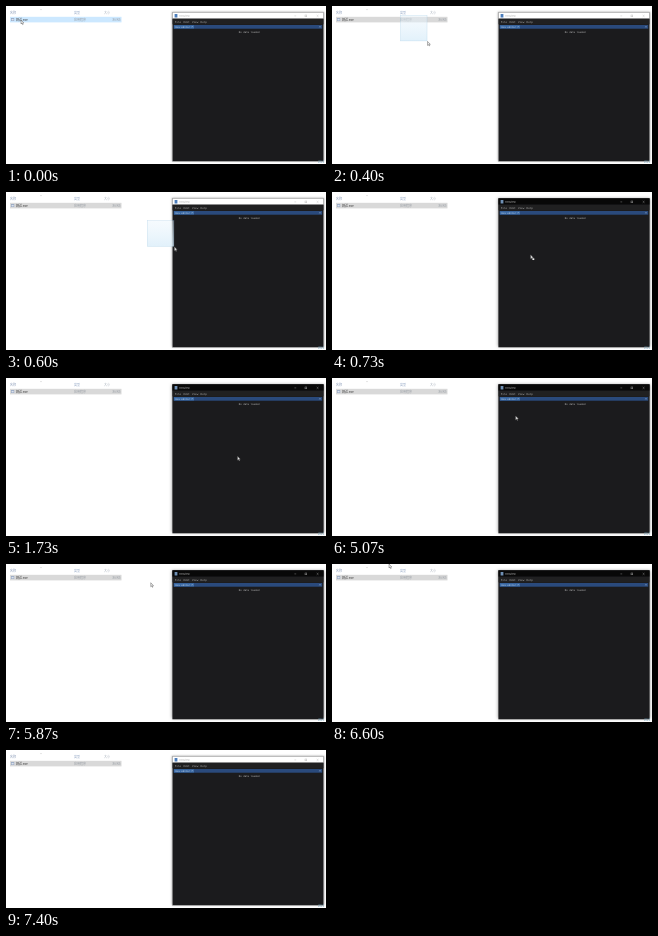
Recreate the animation shown at these times as an HTML page with a canvas. Size 320 by 158 pixels, loop 7590 ms.

```html
<!DOCTYPE html>
<html lang="zh">
<head>
<meta charset="utf-8">
<style>
  html, body { margin: 0; width: 100%; height: 100%; overflow: hidden; background: #fff; }
  canvas { display: block; width: 320px; height: 158px; }
</style>
</head>
<body>
<canvas id="stage"></canvas>
<script>
const LOOP = 7590, TICK = 200 / 3;
const DRAG_START = 130, DROP = 700, BLUR = 7300;
const SANS = '"Noto Sans CJK SC", "Noto Sans CJK", sans-serif';
const MONO = '"DejaVu Sans Mono", monospace';
const canvas = document.getElementById('stage');
const c = canvas.getContext('2d');
const dpr = window.devicePixelRatio || 1;
canvas.width = 320 * dpr;
canvas.height = 158 * dpr;

// Each eased pointer move: start, end, destination
const moves = [
  { from: 70, to: 800, x: 203, y: 64 },
  { from: 1330, to: 1870, x: 237, y: 81 },
  { from: 2600, to: 2800, x: 234, y: 78 },
  { from: 4730, to: 5130, x: 180, y: 35 },
  { from: 5130, to: 5530, x: 172, y: 26 },
  { from: 5600, to: 6330, x: 82, y: 2 },
  { from: 6330, to: 6600, x: 57, y: 0 },
  { from: 6800, to: 6930, x: 52, y: -6 }
];

const ease = k => k * k * (3 - 2 * k);

function pointerAt(t) {
  let x = 15, y = 14;
  for (const m of moves) {
    const k = ease(Math.min(1, Math.max(0, (t - m.from) / (m.to - m.from))));
    x += (m.x - x) * k;
    y += (m.y - y) * k;
  }
  return [x, y];
}

function rect(x, y, w, h, color) {
  c.fillStyle = color;
  c.fillRect(x, y, w, h);
}

function frame(x, y, w, h, color, width = 0.4) {
  c.strokeStyle = color;
  c.lineWidth = width;
  c.strokeRect(x, y, w, h);
}

function text(s, x, y, size, color, family = SANS) {
  c.font = `${size}px ${family}`;
  c.fillStyle = color;
  c.fillText(s, x, y);
}

function line(points, color, width = 0.4) {
  c.beginPath();
  points.forEach(([x, y]) => c.lineTo(x, y));
  c.strokeStyle = color;
  c.lineWidth = width;
  c.stroke();
}

function cross(x, y, r, color) {
  line([[x - r, y - r], [x + r, y + r]], color);
  line([[x - r, y + r], [x + r, y - r]], color);
}

function drawExplorer(focused) {
  line([[34, 4], [35, 3.2], [36, 4]], '#bbb');
  text('名称', 4, 7.6, 3, '#8496b4');
  text('类型', 68, 7.6, 3, '#8ba0c0');
  text('大小', 98, 7.6, 3, '#a3acb8');
  rect(4, 10.8, 111.5, 5.6, focused ? '#cce8ff' : '#d9d9d9');
  rect(5, 12, 3.2, 3, '#9aaac4');
  rect(5.6, 12.9, 2, 1.5, '#dce3ee');
  text('测试.exe', 9.7, 14.8, 3.1, '#333');
  text('应用程序', 68, 14.7, 3, '#969ca3');
  text('86 KB', 106.5, 14.7, 3, '#969ca3');
}

function drawEditor(active) {
  const ink = active ? '#aaa' : '#b5b5b5';
  c.save();
  c.shadowColor = 'rgba(0,0,0,.4)';
  c.shadowBlur = (active ? 3 : 2) * dpr;
  rect(166.4, 6.3, 151.2, 149, '#1b1b1d');
  c.restore();
  rect(166.4, 6.3, 151.2, 6.4, active ? '#080808' : '#fff');
  if (!active) frame(166.4, 6.3, 151.2, 149, '#aaa');

  rect(168.6, 8, 2.8, 3.5, active ? '#6f90b5' : '#4b7dbb');
  text('HexView', 173, 10.9, 2.7, ink);
  line([[288.4, 9.9], [290.2, 9.9]], ink);
  frame(299, 9, 1.8, 1.8, ink);
  cross(311.6, 9.9, 0.9, ink);

  rect(166.6, 12.7, 150.8, 5.6, '#202021');
  ['File', 'Edit', 'View', 'Help'].forEach((s, i) =>
    text(s, 168.8 + i * 8.6, 16.6, 2.6, '#b0b0b0', MONO));

  rect(167.6, 19, 148.6, 3.7, '#2a4a7c');
  rect(168, 19.2, 20, 3.3, '#3b6aa5');
  text('Hex editor', 169.5, 21.7, 2.4, '#c5d3e4', MONO);
  cross(186.3, 20.8, 0.7, '#a5bcd6');
  cross(314, 20.8, 0.7, '#a5bcd6');
  text('No data loaded', 232.8, 26.5, 2.45, '#bbb', MONO);
}

function drawGhost(x, y) {
  const fill = c.createLinearGradient(0, y - 26, 0, y);
  fill.addColorStop(0, 'rgba(232,244,252,.4)');
  fill.addColorStop(1, 'rgba(215,236,249,.75)');
  rect(x - 27, y - 26, 26.5, 25.5, fill);
  frame(x - 27, y - 26, 26.5, 25.5, 'rgba(150,195,225,.6)');
}

function drawPointer(x, y) {
  c.save();
  c.translate(x, y);
  c.beginPath();
  [[0, 0], [0, 4], [0.9, 3.2], [1.6, 4.6], [2.2, 4.3], [1.6, 3], [2.8, 2.9]]
    .forEach(([px, py]) => c.lineTo(px, py));
  c.closePath();
  c.fillStyle = '#eee';
  c.strokeStyle = '#444';
  c.lineWidth = 0.4;
  c.fill();
  c.stroke();
  c.restore();
}

function draw() {
  const t = Math.floor((performance.now() % LOOP + 5) / TICK) * TICK;
  const [x, y] = pointerAt(t);
  c.setTransform(dpr, 0, 0, dpr, 0, 0);
  rect(0, 0, 320, 158, '#fff');
  drawExplorer(t < DRAG_START);
  drawEditor(t > DROP && t < BLUR);
  text('2022', 312, 157.4, 2.8, '#78a9c4');
  if (t > DRAG_START && t < DROP) drawGhost(x, y);
  drawPointer(x, y);
  if (t > DROP && t < DROP + 80) rect(x + 2, y + 3.5, 1.7, 1.7, '#eee');
  requestAnimationFrame(draw);
}
draw();
</script>
</body>
</html>
```
